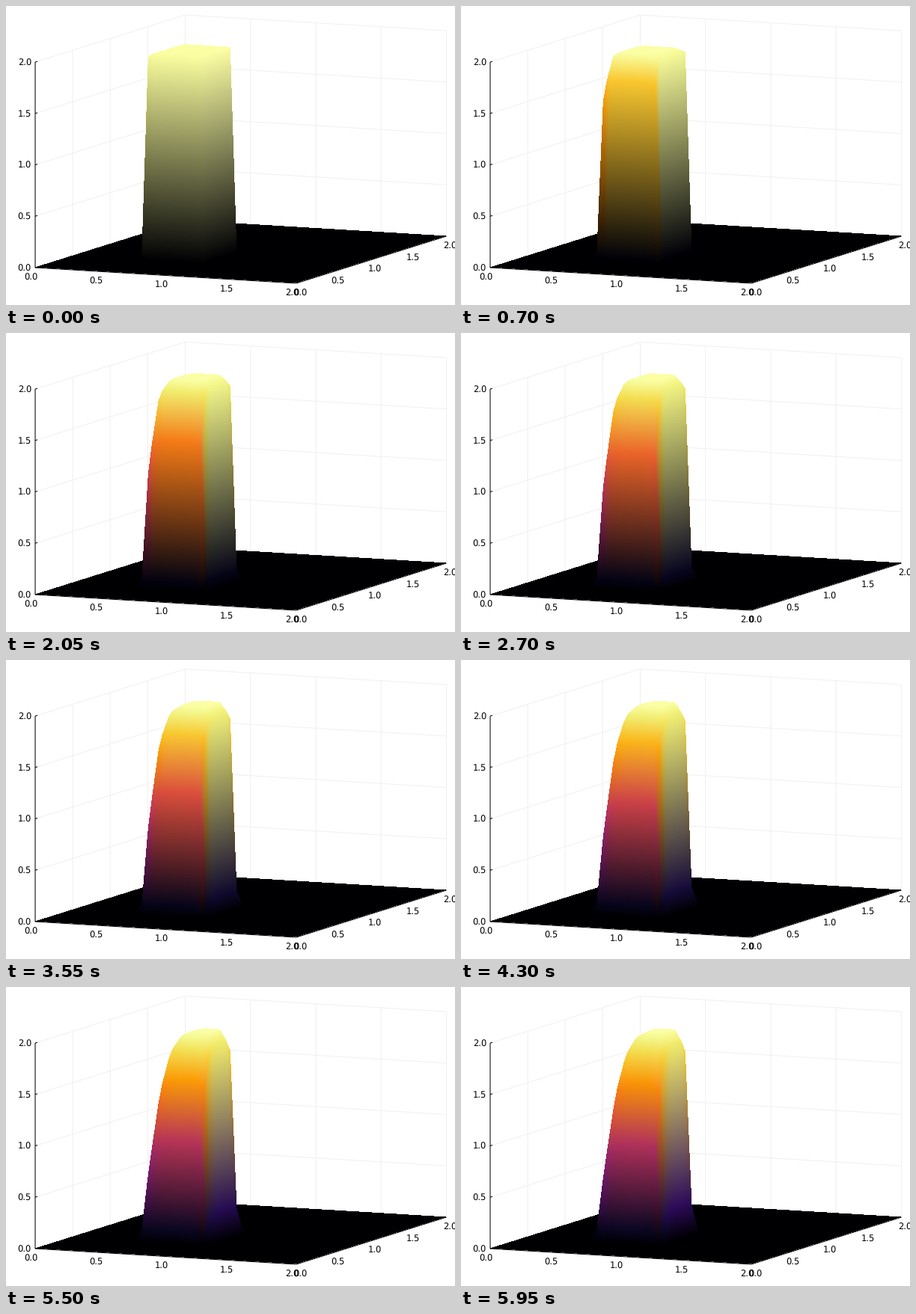
These frames come from a looping animation (600x400 px, 6000 ms). A matplotlib script:

```python
import numpy as np
import matplotlib.pyplot as plt
from matplotlib.animation import FuncAnimation

plt.rcParams["text.hinting"] = "no_hinting"

W, H, DPI = 600, 400, 100
FRAMES, INTERVAL = 120, 50

# 2D Burgers flow of a square hat
N = 41
DX = 2 / (N - 1)
NU = 0.01
DT = 0.0009 * DX * DX / NU

# Screen position of the axes' corner and of one unit along each axis
ORIGIN = np.array([38.5, 349.5])
AXES = np.array([[174.5, 10.5], [100.25, -31.5], [0.0, -137.5]])
# The surface is a hard-edged raster set slightly up and left of the axes
RASTER_SHIFT = np.array([-0.25, -0.5])
CMAP = plt.get_cmap("inferno")


def project(x, y, z):
    return ORIGIN + np.stack([x, y, z], axis=-1) @ AXES


def step(u):
    c = u[1:-1, 1:-1]
    w, e, s, n = u[1:-1, :-2], u[1:-1, 2:], u[:-2, 1:-1], u[2:, 1:-1]
    out = u.copy()
    out[1:-1, 1:-1] = (c - DT / DX * c * (2 * c - w - s)
                       + NU * DT / DX**2 * (w + e + s + n - 4 * c))
    return out


def solve():
    u = np.zeros((N, N))
    u[11:20, 11:20] = 2
    states = []
    for _ in range(FRAMES):
        u = step(u)
        states.append(u)
    return states


def fill_triangle(img, p, colors):
    """Paint one triangle with colours blended between its corners."""
    x0, y0 = np.maximum(np.ceil(p.min(axis=0)), 0).astype(int)
    x1, y1 = np.floor(p.max(axis=0)).astype(int) + 1
    (ax, ay), (bx, by), (cx, cy) = p.tolist()
    area = (bx - ax) * (cy - ay) - (cx - ax) * (by - ay)
    if abs(area) < 1e-9 or x1 <= x0 or y1 <= y0:
        return
    xs = np.arange(x0, x1)[None, :]
    ys = np.arange(y0, y1)[:, None]
    b = ((xs - ax) * (cy - ay) - (cx - ax) * (ys - ay)) / area
    c = ((bx - ax) * (ys - ay) - (xs - ax) * (by - ay)) / area
    a = 1 - b - c
    inside = (a >= -1e-9) & (b >= -1e-9) & (c >= -1e-9)
    weights = np.stack([a[inside], b[inside], c[inside]], axis=-1)
    img[y0:y1, x0:x1][inside] = weights @ colors


def make_floor():
    img = np.zeros((H, W, 4))
    corners = project(np.array([0, 2, 2, 0]), np.array([0, 0, 2, 2]), np.zeros(4))
    corners += RASTER_SHIFT
    black = np.tile(CMAP(0.0), (3, 1))
    for idx in ([0, 1, 2], [0, 2, 3]):
        fill_triangle(img, corners[idx], black)
    return img


def render(u):
    img = FLOOR.copy()
    pts = project(GX, GY, u) + RASTER_SHIFT
    colors = CMAP(u / 2)
    # Back to front: the viewer stands at large x and small y
    for j in range(N - 2, -1, -1):
        for i in range(N - 1):
            if u[j:j + 2, i:i + 2].max() < 0.004:
                continue
            for rows, cols in (([j, j + 1, j + 1], [i + 1, i + 1, i]),
                               ([j, j, j + 1], [i, i + 1, i])):
                fill_triangle(img, pts[rows, cols], colors[rows, cols])
    return np.clip(img, 0, 1)


grid = np.linspace(0, 2, N)
GX, GY = np.meshgrid(grid, grid)
FLOOR = make_floor()
STATES = solve()

fig = plt.figure(figsize=(W / DPI, H / DPI), dpi=DPI, facecolor="white")
ax = fig.add_axes([0, 0, 1, 1])
ax.axis("off")


def line(p, q, color="black"):
    a, b = project(*np.array(p, float)), project(*np.array(q, float))
    ax.plot([a[0], b[0]], [a[1], b[1]], color=color, lw=0.72, zorder=1,
            solid_capstyle="butt", snap=False)


def label(x, y, value, ha="center"):
    ax.text(x, y, f"{value:.1f}", fontsize=8.3, family="DejaVu Sans",
            ha=ha, va="center_baseline", zorder=4)


GRID = "#f0f0f0"
TICKS = np.linspace(0, 2, 5)
for t in TICKS:
    line((0, t, 0), (0, t, 2), GRID)
    line((t, 2, 0), (t, 2, 2), GRID)
    line((0, 0, t), (0, 2, t), GRID)
    line((0, 2, t), (2, 2, t), GRID)

for t in TICKS:
    line((0, 0, t), (0, 0.03, t))
    x, y = project(t, 0, 0)
    label(x - 6, y + 12, t)
    x, y = project(2, t, 0)
    label(x + 5, y + 12, t)
    x, y = project(0, 0, t)
    label(x - 5, y, t, "right")

line((0, 0, 0), (0, 0, 2))
line((0, 0, 0), (2, 0, 0))
line((2, 0, 0), (2, 2, 0))

surface = ax.imshow(FLOOR, extent=(-0.5, W - 0.5, H - 0.5, -0.5),
                    interpolation="nearest", aspect="auto", zorder=2)
ax.set_xlim(-0.5, W - 0.5)
ax.set_ylim(H - 0.5, -0.5)


def update(k):
    surface.set_data(render(STATES[k]))
    return (surface,)


anim = FuncAnimation(fig, update, frames=FRAMES, interval=INTERVAL,
                     repeat=True, repeat_delay=0, blit=False)
plt.show()
```
